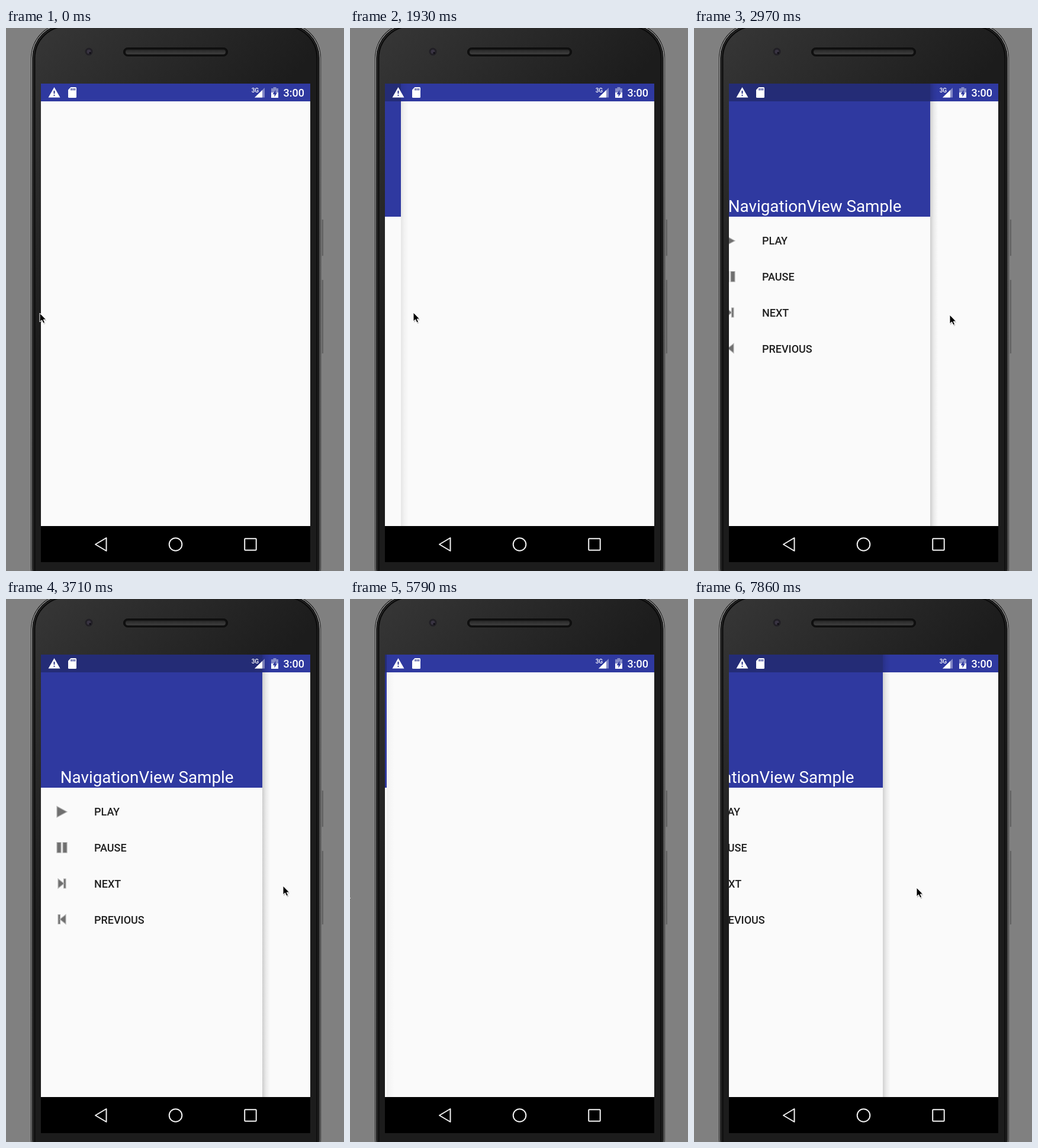
An HTML page for the animation above (8000 ms loop, 571 px wide and 918 px high).

```html
<!DOCTYPE html>
<html lang="en">
<head>
<meta charset="utf-8">
<title>Navigation drawer</title>
<style>
  html, body { margin: 0; width: 100%; height: 100%; overflow: hidden; background: #808080; }
  svg { display: block; width: 100%; height: 100%; }
  text { font-family: Roboto, sans-serif; }
  .title { font-size: 27.8px; fill: #fff; }
  .item { font-size: 18px; font-weight: 500; fill: #1f1f1f; }
  .icon { fill: #6f6f6f; stroke: #b4b4b4; stroke-width: 1.2; }
  .nav { fill: none; stroke: #f2f2f2; stroke-width: 2; }
</style>
</head>
<body>
<svg viewBox="0 0 571 918">
  <defs>
    <linearGradient id="body" gradientUnits="userSpaceOnUse" x1="60" y1="0" x2="330" y2="250">
      <stop offset="0" stop-color="#363636"/>
      <stop offset=".5" stop-color="#292929"/>
      <stop offset="1" stop-color="#1c1c1c"/>
    </linearGradient>
    <linearGradient id="rim" x1="0" x2="0" y1="0" y2="1">
      <stop offset="0" stop-color="#d8d8d8"/>
      <stop offset=".35" stop-color="#b0b0b0"/>
      <stop offset="1" stop-color="#9a9a9a"/>
    </linearGradient>
    <linearGradient id="grille" x1="0" x2="0" y1="0" y2="1">
      <stop offset="0" stop-color="#262626"/>
      <stop offset="1" stop-color="#404040"/>
    </linearGradient>
    <linearGradient id="shade">
      <stop offset="0" stop-color="#000" stop-opacity=".18"/>
      <stop offset=".45" stop-color="#000" stop-opacity=".07"/>
      <stop offset="1" stop-color="#000" stop-opacity="0"/>
    </linearGradient>
    <clipPath id="screen"><rect x="59" y="94" width="455" height="748"/></clipPath>
  </defs>

  <!-- phone -->
  <path d="M531 323h5v63h-5zM531 425h5v126h-5z" fill="#7c7c7c"/>
  <path d="M535 324v61M535 426v124" stroke="#404040"/>
  <rect x="42" y="-9" width="490" height="980" rx="60" fill="#161616"/>
  <rect x="43.5" y="-7.5" width="487" height="980" rx="58.5" fill="none" stroke="url(#rim)"/>
  <rect x="46" y="-5" width="482" height="980" rx="56" fill="#2a2a2a"/>
  <rect x="48.5" y="-3" width="477" height="980" rx="54" fill="url(#body)" stroke="#0a0a0a" stroke-width="2"/>
  <rect x="198.5" y="33.5" width="176" height="14" rx="7" fill="#101010" stroke="#0a0a0a"/>
  <rect x="202" y="36.5" width="169" height="8" rx="4" fill="url(#grille)"/>
  <circle cx="140" cy="40" r="6.5" fill="#211f25"/>
  <circle cx="140" cy="40" r="3.5" fill="#393442"/>
  <circle cx="142" cy="42" r="1.5" fill="#0b0a10"/>

  <!-- screen -->
  <rect x="59" y="94" width="455" height="809"/>
  <rect x="59" y="94" width="455" height="748" fill="#fafafa"/>
  <rect x="59" y="94" width="455" height="30" fill="#2f39a0"/>

  <g clip-path="url(#screen)">
    <g id="drawer">
      <rect id="shadow" x="433" y="94" width="13" height="748" fill="url(#shade)"/>
      <rect x="59" y="124" width="374" height="718" fill="#fafafa"/>
      <rect x="59" y="94" width="374" height="30" fill="#242c76"/>
      <rect x="59" y="124" width="374" height="195" fill="#2f39a0"/>
      <text class="title" x="91.7" y="311">NavigationView Sample</text>
      <g class="item">
        <text x="149" y="366.4">PLAY</text>
        <text x="149" y="427">PAUSE</text>
        <text x="149" y="487.8">NEXT</text>
        <text x="149" y="548.5">PREVIOUS</text>
      </g>
      <g class="icon">
        <path d="M86 350.5V369L103 359.7Z"/>
        <path d="M86 411.5h7V429h-7zM96 411.5h7V429h-7z"/>
        <path id="skip" d="M88 473V489L98 481ZM97.5 473h3.5v16h-3.5z"/>
        <use href="#skip" transform="matrix(-1 0 0 1 189 60.5)"/>
      </g>
    </g>
  </g>

  <!-- status icons -->
  <g fill="#fff">
    <path d="M81.5 100L91.5 117.5H71.5Z"/>
    <path d="M109.5 100H117.5Q119 100 119 101.5V116.5Q119 118 117.5 118H106.5Q105 118 105 116.5V104.5Z"/>
    <path d="M80.5 106h2v5h-2zM80.5 112.8h2v2h-2zM109.5 102h1.6v3.5h-1.6zM112.5 102h1.6v3.5h-1.6zM115.5 102h1.6v3.5h-1.6z" fill="#2a338c"/>
    <path d="M437 101V117.5H420Z" opacity=".4"/>
    <path d="M433 105V117.5H420Z"/>
    <path d="M451.5 100h5v2h3.5v7h-12v-7h3.5z" opacity=".42"/>
    <path d="M448 109h12v9h-12z"/>
    <path d="M455.5 104.5L450.5 112H453.5V116.5L458 109.5H455.5Z" fill="#2f39a0"/>
    <text x="414.7" y="108.5" font-size="10" font-weight="500">3G</text>
    <text x="468.5" y="116" font-size="18" font-weight="500">3:00</text>
  </g>

  <g class="nav">
    <path d="M169.5 862V884L151 873Z" stroke-linejoin="round"/>
    <circle cx="286.5" cy="873" r="10.8"/>
    <rect x="403.2" y="863.2" width="19.5" height="19.5" rx="1"/>
  </g>

  <g id="pointer">
    <path d="M1 2V17L4.5 14L7 19L9.5 18L7.5 13H11.5Z" fill="#000" opacity=".22"/>
    <path d="M0 0V15L3.5 11.8L6 17.2L8.6 16L6.2 11H10.7Z" stroke="#fff" stroke-linejoin="round"/>
  </g>
</svg>
<script>
  const LOOP = 8000, STEPS = 54;
  const CLOSED = 59, OPEN = 433;

  const linear = u => u;
  const smooth = u => u * u * (3 - 2 * u);
  const easeOut = u => 1 - (1 - u) ** 4;

  // Each move starts where the one before it ended; times are in steps.
  const pointerMoves = [
    { from: 0, to: 3, end: [85, 482], ease: linear },
    { from: 4, to: 9, end: [61, 481], ease: linear },
    { from: 10.6, to: 22.1, end: [468, 485], ease: smooth },
    { from: 25, to: 30, end: [434, 493], ease: easeOut },
    { from: 32, to: 39.7, end: [-21, 495], ease: smooth },
    { from: 40, to: 48, end: [59, 486], ease: smooth },
    { from: 48, to: 55.25, end: [470, 489], ease: smooth }
  ];
  const drawerMoves = [
    { from: 11.25, to: 22, end: [OPEN], ease: smooth },
    { from: 32.55, to: 39.35, end: [CLOSED], ease: smooth },
    { from: 48.5, to: 55.6, end: [OPEN], ease: smooth }
  ];

  const clamp = u => Math.min(1, Math.max(0, u));

  function poseAt(step, origin, moves) {
    return moves.reduce((pose, { from, to, end, ease }) => {
      const u = ease(clamp((step - from) / (to - from)));
      return pose.map((v, i) => v + (end[i] - v) * u);
    }, origin).map(Math.round);
  }

  const [drawer, shadow, pointer] =
    ['drawer', 'shadow', 'pointer'].map(id => document.getElementById(id));
  const place = (el, x, y) => el.setAttribute('transform', `translate(${x} ${y})`);
  let start;

  function draw(now) {
    start ??= now;
    const t = (now - start) % LOOP;
    // The small bias absorbs the 10 ms rounding of the step times.
    const step = Math.min(STEPS - 1, Math.floor(t * STEPS / LOOP + 0.05));
    const [edge] = poseAt(step, [CLOSED], drawerMoves);
    place(drawer, edge - OPEN, 0);
    shadow.setAttribute('opacity', ((edge - CLOSED) / (OPEN - CLOSED)) ** 0.3);
    place(pointer, ...poseAt(step, [57, 482], pointerMoves));
    requestAnimationFrame(draw);
  }
  requestAnimationFrame(draw);
</script>
</body>
</html>
```
